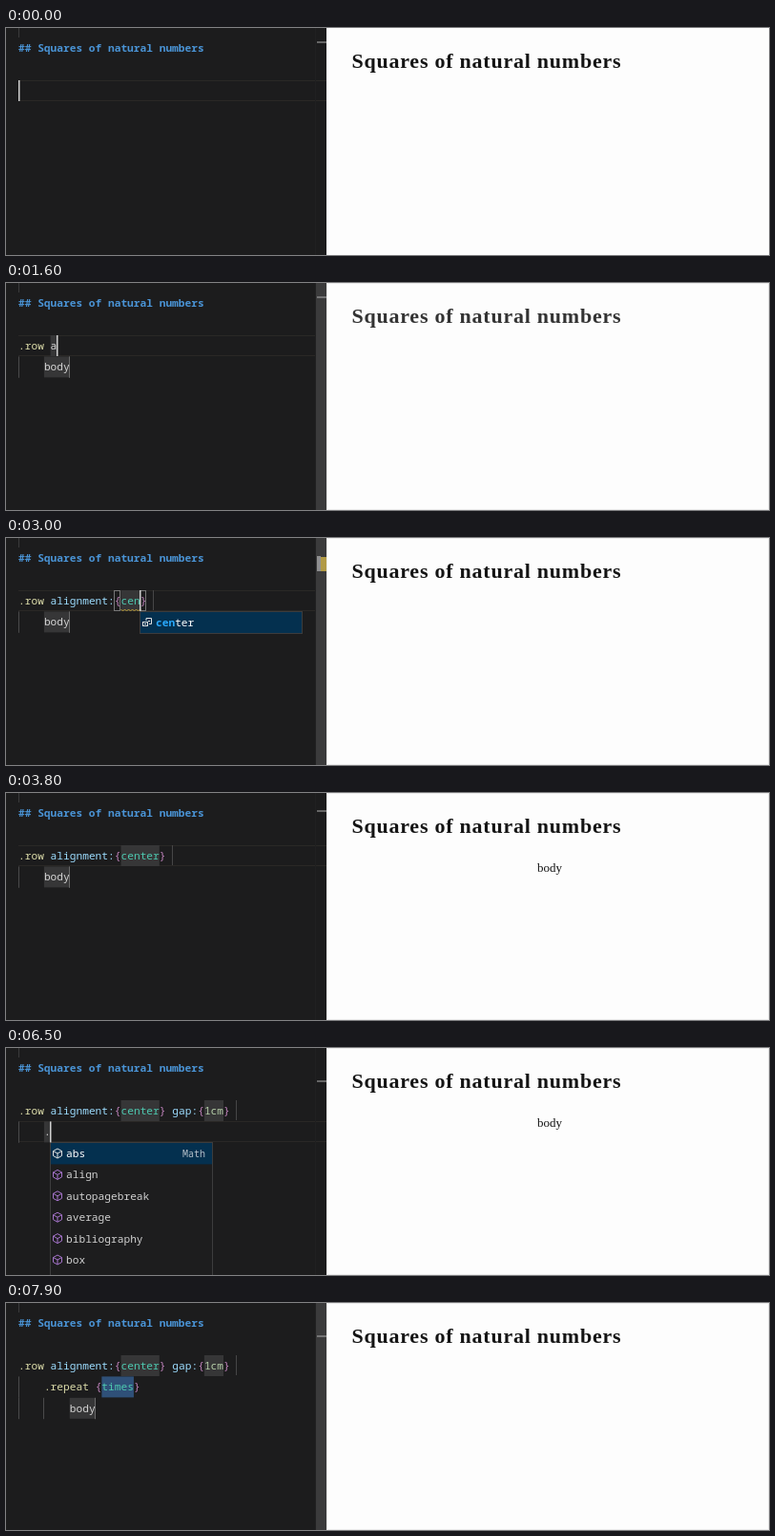
Write an HTML page with a canvas that moves like this. It is 800 by 239 pixels and loops after 8000 ms.

```html
<!DOCTYPE html>
<html lang="en">
<meta charset="utf-8">
<title>Squares of natural numbers</title>
<style>
  html, body { margin: 0; width: 100%; height: 100%; overflow: hidden; background: #1c1c1d; }
  canvas { display: block; }
</style>
<canvas width="800" height="239"></canvas>
<script>
const ctx = document.querySelector('canvas').getContext('2d');
const LOOP = 8000, FRAME = 100, CHAR = 6.72, LEFT = 13, ROW = 22.4, EDGE = 336;
const MONO = '"Noto Sans Mono", "DejaVu Sans Mono", monospace';
const SERIF = '"Liberation Serif", serif';

// Popups: [items, matched letters, detail, is enum]
const all = [['abs', 'align', 'autopagebreak', 'average', 'bibliography', 'box', 'br'], 0, 'Math'];
const startR = [['range', 'read', 'repeat', 'replace', 'round', 'row'], 1, 'Math'];
const sides = [['start', 'center', 'end', 'spacebetween', 'spacearound', 'spaceevenly'], 0, '', true];
const one = (word, n, detail, isEnum) => [[word], n, detail, isEnum];

const A = '.row alignment:', C = A + '{center} ', G = C + 'gap:{1cm}', B = ['    body'];
// Editor states: [start, first line, lines below, cursor line, cursor column, popup, selecting]
const steps = [
  [-400, '', [], 0, 0],
  [500, '', [], 0, 0],
  [700, '.', [], 0, 1, all],
  [900, '.r', [], 0, 2, startR],
  [1000, '.ro', [], 0, 3, [['row', 'round'], 2, 'Layout']],
  [1100, '.row', [], 0, 4, one('row', 3, 'Layout')],
  [1300, '.row ', B, 0, 5],
  [1600, '.row a', B, 0, 6],
  [1700, '.row al', B, 0, 7, one('alignment', 2)],
  [1900, '.row ali', B, 0, 8, one('alignment', 3)],
  [2100, A + '{}', B, 0, 16, sides],
  [2500, A + '{c}', B, 0, 17, [['center', 'spacebetween'], 1, '', true]],
  [2700, A + '{ce}', B, 0, 18, one('center', 2, '', true)],
  [2900, A + '{cen}', B, 0, 19, one('center', 3, '', true)],
  [3300, C.trim(), B, 0, 24],
  [4200, C + 'g', B, 0, 25, one('gap', 1)],
  [4400, C + 'ga', B, 0, 26, one('gap', 2)],
  [4600, C + 'gap:{}', B, 0, 29],
  [4900, C + 'gap:{1}', B, 0, 30],
  [5100, C + 'gap:{1c}', B, 0, 31],
  [5200, G, B, 0, 32],
  [5500, G, B, 0, 34],
  [6200, G, B, 1, 8, null, true],
  [6500, G, ['    .'], 1, 5, all],
  [6800, G, ['    .r'], 1, 6, startR],
  [6900, G, ['    .re'], 1, 7, [['read', 'repeat', 'replace'], 2, 'IO']],
  [7100, G, ['    .rep'], 1, 8, [['repeat', 'replace'], 3, 'Flow']],
  [7400, G, ['    .repeat {times}', '        body'], 1, 18, null, true],
];

// Preview reloads: [start, body shown]
const reloads = [[-400, 0], [1500, 0], [2700, 0], [3400, 1], [4400, 0], [4900, 1], [5400, 1], [6800, 0], [7600, 0]];

const latest = (list, t) => list.filter(entry => entry[0] <= t).pop();
const colX = col => LEFT + col * CHAR;
const rowY = line => 55 + line * ROW;

function rect(x, y, w, h, color) {
  ctx.fillStyle = color;
  ctx.fillRect(x, y, w, h);
}
function frame(x, y, w, h, color) {
  ctx.strokeStyle = color;
  ctx.lineWidth = 1;
  ctx.strokeRect(Math.floor(x) + .5, Math.floor(y) + .5, Math.round(w), Math.round(h));
}
function path(points, color) {
  ctx.strokeStyle = color;
  ctx.lineWidth = 1;
  ctx.beginPath();
  points.forEach(([x, y]) => ctx.lineTo(x, y));
  ctx.stroke();
}
function text(str, x, y, color, font = `500 11.2px ${MONO}`, spacing = 0) {
  ctx.font = font;
  ctx.letterSpacing = spacing + 'px';
  ctx.fillStyle = color;
  ctx.fillText(str, x, y);
}

function codeLine(str, line, inSnippet, selecting) {
  const y = rowY(line);
  let inBraces = false;
  for (const { 0: token, index } of str.matchAll(/\.\w+|[{}]|\w+:?|\S/g)) {
    const x = colX(index), w = token.length * CHAR;
    let color = '#d4d4d4';
    if (/[{}]/.test(token)) {
      inBraces = token === '{';
      color = '#c586c0';
    } else if (/^\.\w/.test(token)) color = '#dcdcaa';
    else if (token.endsWith(':')) color = '#9cdcfe';
    else {
      if (inBraces) color = /^\d/.test(token) ? '#b5cea8' : '#4ec9b0';
      const chosen = selecting && line === 1;
      if (inSnippet) rect(x, y, w, ROW - .4, chosen ? '#2f5078' : '#363637');
      if (token === 'body') rect(Math.round(x + w) - 1, y, 1, ROW, '#6a6a6a');
      if (inBraces && /^c(en?)?$/.test(token)) {
        const wave = Array.from({ length: Math.ceil(w / 2) + 1 }, (_, i) => [x + i * 2, y + 20 + i % 2 * 2]);
        path(wave, '#bfa03a');
      }
    }
    text(token, x, y + 15, color);
  }
}

function cube(x, y, color) {
  const p = (dx, dy) => [x + dx, y + dy];
  path([p(0, -5), p(4.5, -2.5), p(4.5, 2.5), p(0, 5), p(-4.5, 2.5), p(-4.5, -2.5), p(0, -5)], color);
  path([p(-4.5, -2.5), p(0, 0), p(4.5, -2.5)], color);
  path([p(0, 0), p(0, 5)], color);
}
function enumIcon(x, y, color) {
  frame(x - 5, y - 1, 5, 4, color);
  path([[x - 1, y - 2], [x - 1, y - 4.5], [x + 4.5, y - 4.5], [x + 4.5, y + 1.5], [x + 2, y + 1.5]], color);
  rect(x - 3, y + 1, 2, 1, color);
  rect(x + 1, y - 2, 2, 1, color);
}

function popup([items, matched, detail, isEnum], x, y) {
  const w = 170, h = items.length * ROW + 2;
  rect(x, y, w, h, '#1d1d1e');
  items.forEach((item, i) => {
    const top = y + 1 + i * ROW, mid = top + 11, active = i === 0;
    if (active) rect(x, top, w, ROW, '#04304f');
    (isEnum ? enumIcon : cube)(x + 8, mid, active ? '#e0e0e0' : '#a674cc');
    const n = item.startsWith('space') || item === 'end' ? 0 : matched;
    text(item.slice(0, n), x + 17, mid + 4, '#2aaaff', `bold 11.2px ${MONO}`);
    text(item.slice(n), x + 17 + n * CHAR, mid + 4, active ? '#ffffff' : '#d0d0d0');
    if (active && detail) {
      text(detail, x + w - 7 - detail.length * 6, mid + 3.5, '#b4bec8', `10px ${MONO}`);
    }
  });
  frame(x, y, w, h - 1, '#3c3c3d');
}

function editor(t) {
  const [start, first, below, line, col, list, selecting] = latest(steps, t);
  const lines = [first, ...below], y = rowY(line);
  rect(0, 0, EDGE, 239, '#1c1c1d');
  rect(13, 0, 1, 10, '#3a3a3b');
  text('## Squares of natural numbers', LEFT, 25, '#4a94d6', `bold 11.2px ${MONO}`);

  if (!selecting) {
    rect(13, Math.floor(y), EDGE, 1, '#2a2826');
    rect(13, Math.floor(y + ROW) - 1, EDGE, 1, '#2a2826');
  }
  below.forEach((str, i) => {
    for (let c = 0; c <= i; c++) rect(Math.floor(colX(c * 4)), rowY(i + 1), 1, ROW, '#4a4a4b');
  });
  lines.forEach((str, i) => codeLine(str, i, below.length > 0, selecting));
  if (first.includes('{')) rect(Math.floor(colX(first.length + 1)), 55, 1, 21, '#464647');

  const open = lines[line].lastIndexOf('{'), close = lines[line].lastIndexOf('}');
  if (!selecting && open >= 0 && col > open && col <= close) {
    for (const c of [open, close]) frame(colX(c), y, CHAR - 1, ROW - 1, '#777777');
  }

  // Scroll strip with its marks
  rect(324, 0, 1, 239, '#202021');
  if ((t >= 1300 && t < 3300) || t >= 7400) rect(325, 0, 11, 239, '#3b3b3c');
  if (/\{c(en?)?\}/.test(first)) {
    rect(326, 19, 4, 16, '#8f8f8f');
    rect(330, 20, 6, 15, '#b19a45');
  } else if (t >= 4700 && t < 5400) {
    text('T', 325, 35, '#8c8c8c', 'bold 23px "Liberation Sans", sans-serif');
  } else {
    rect(326, t < 2100 ? 14.5 : t < 6200 ? 18.5 : 34.5, 10, 1, '#b0b0b0');
  }

  if (list) popup(list, Math.floor(colX(col)), Math.floor(y + ROW));
  const blinkOn = Math.floor((t - start) / 500) % 2 === 0;
  if (!selecting && blinkOn) rect(Math.floor(colX(col)), y, 1.5, ROW - .4, '#d0d0d0');
}

function preview(t) {
  const [start, hasBody] = latest(reloads, t);
  const shown = Math.min(1, (t - start) / 300);
  rect(EDGE, 0, 800 - EDGE, 239, '#fdfdfd');
  if (t >= 1500) frame(EDGE, 0, 799 - EDGE, 238, '#ececec');
  ctx.globalAlpha = .8 + .2 * shown;
  text('Squares of natural numbers', 362.5, 42, '#141414', `bold 22px ${SERIF}`, .76);
  ctx.globalAlpha = hasBody * shown;
  text('body', 557, 83, '#141414', `13px ${SERIF}`);
  ctx.globalAlpha = 1;
}

function draw() {
  const t = Math.floor(performance.now() % LOOP / FRAME) * FRAME;
  editor(t);
  preview(t);
  requestAnimationFrame(draw);
}
draw();
</script>
</html>
```
